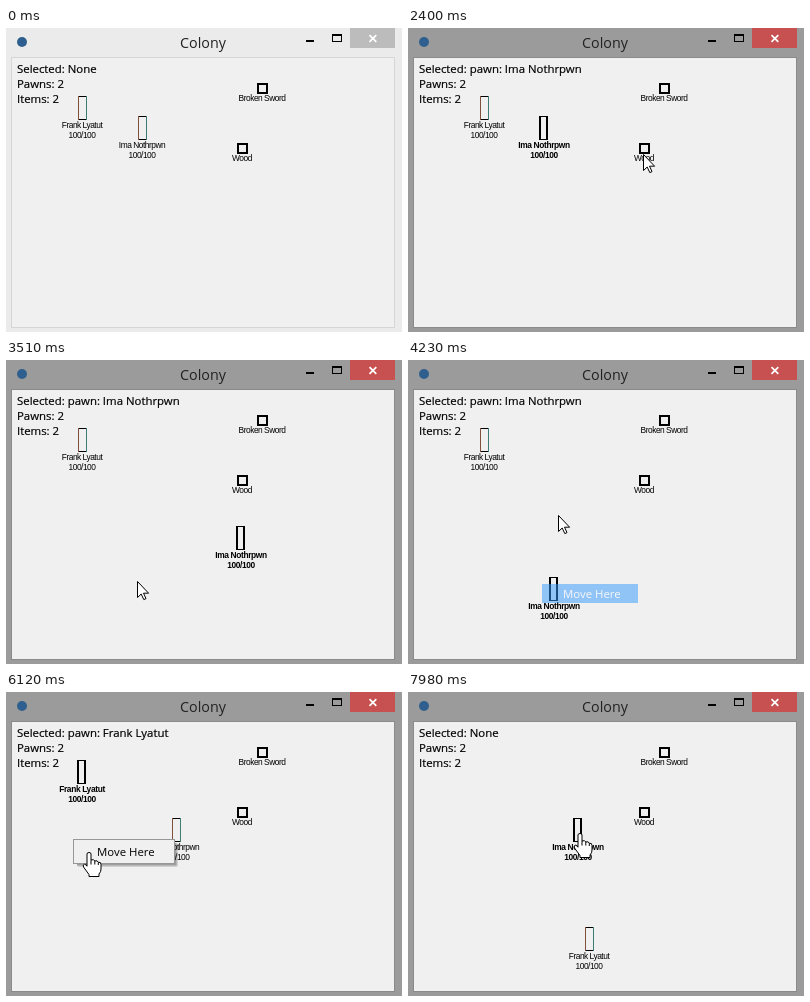
Animation, 396 px wide and 304 px high, one loop 8 s. Source, as an HTML page:

```html
<!DOCTYPE html>
<html lang="en">
<head>
<meta charset="utf-8">
<title>Colony</title>
<style>
html, body { margin: 0; width: 100%; height: 100%; overflow: hidden; background: #ebebeb; }
svg { display: block; width: 396px; height: 304px; }
.ui { font: 11.4px "Open Sans", "Noto Sans", sans-serif; }
.status { stroke: #000; stroke-width: .2px; }
.tag { font: 8.4px "Liberation Sans", sans-serif; letter-spacing: -.48px; text-anchor: middle; }
.bold .tag { font-weight: bold; letter-spacing: -.36px; }
</style>
</head>
<body>
<svg id="stage" viewBox="0 0 396 304" xmlns="http://www.w3.org/2000/svg">
  <rect id="frame" width="396" height="304"/>
  <circle cx="16" cy="14" r="5" fill="#2f5f8f"/>
  <text class="ui" x="197" y="20" text-anchor="middle" style="font-size:14.3px" fill="#222">Colony</text>
  <rect id="close" x="344" width="45" height="20"/>
  <path d="M363.5 7.2l6.8 6.6m0-6.6l-6.8 6.6" stroke="#fff" stroke-width="1.7"/>
  <path d="M300 12h8v2h-8z"/>
  <path d="M326 6h10v8h-10zM327 8v5h8V8z" fill-rule="evenodd"/>
  <rect id="canvas" x="5.5" y="29.5" width="383" height="270" fill="#f0f0f0"/>
  <g class="ui status">
    <text id="picked" x="11" y="45"></text>
    <text x="11" y="60">Pawns: 2</text>
    <text x="11" y="75">Items: 2</text>
  </g>
  <g id="items"></g>
  <g id="pawns"></g>
  <g id="menu">
    <g id="panel">
      <g fill="#000" fill-opacity=".13">
        <rect x="4" y="4" width="101" height="24" rx="2"/>
        <rect x="4" y="4" width="100" height="23" rx="1"/>
        <rect x="4" y="4" width="99" height="22"/>
      </g>
      <rect x=".5" y=".5" width="101" height="24" fill="#f0f0f0" stroke="#979797"/>
    </g>
    <rect id="glow" x="3" y="3" width="96" height="19" fill="#3399ff"/>
    <text id="option" class="ui" x="24" y="17">Move Here</text>
  </g>
  <g id="pointer" fill="#fff" stroke="#000" stroke-linejoin="round">
    <path id="arrow" d="M.5 .5V16.5L4.2 13L6.8 18.6L9 17.6L6.5 12.2H11.6Z"/>
    <path id="hand" transform="translate(0 -1)" d="M-2 2Q-2 .5 0 .5Q2 .5 2 2V8Q5 6.8 5.8 9Q8.6 8 9.3 10.3Q12 9.6 12 12.5V17Q12 20 10 22V24.5H0V22.5L-5.5 15Q-6.5 12.5 -4.5 12.2Q-3 12.5 -2 14.2ZM2 8V12.5M5.8 9V12.5M9.3 10.3V13"/>
  </g>
</svg>
<script>
const LOOP = 8000, TICK = 30;
const TRIP = 230, REST = 120, FADE_IN = 150, FADE_OUT = 240;
const $ = id => document.getElementById(id);
const clamp = v => Math.max(0, Math.min(1, v));
const easeOut = v => 1 - (1 - v) ** 2;
const show = (el, on) => el.setAttribute("display", on ? "inline" : "none");
const place = (el, x, y) => el.setAttribute("transform", `translate(${x} ${y})`);

function add(parent, tag, attrs, text) {
  const el = document.createElementNS("http://www.w3.org/2000/svg", tag);
  for (const k in attrs) el.setAttribute(k, attrs[k]);
  if (text) el.textContent = text;
  return parent.appendChild(el);
}

const frank = { name: "Frank Lyatut", home: [76, 80] };
const ima = { name: "Ima Nothrpwn", home: [136, 100] };
const pawns = [frank, ima];

const picks = [
  { pawn: ima, from: 1380, to: 5310 },
  { pawn: frank, from: 5490, to: 7590 },
  { pawn: ima, from: 7980, to: LOOP }
];

// The pointer reaches a menu corner, then clicks where the pawn should go.
const moves = [
  { pawn: ima, corner: [217, 170], drop: [235, 178], reach: 2630, click: 3050 },
  { pawn: ima, corner: [131, 221], drop: [146, 229], reach: 3510, click: 4110 },
  { pawn: ima, corner: [152, 128], drop: [170, 138], reach: 4350, click: 4820 },
  { pawn: frank, corner: [67, 147], drop: [83, 161], reach: 5700, click: 6180 },
  { pawn: frank, corner: [158, 237], drop: [181, 247], reach: 6510, click: 7110 }
];
for (const m of moves) m.open = m.reach + REST;

const trip = (from, to, spot) => ({ from, to, spot });
const trips = [
  trip(150, 900, [141, 107]),
  trip(930, 1230, [135, 95]),
  trip(1380, 2220, [235, 126]),
  trip(4840, 5190, [72, 79]),
  trip(7140, 7470, [172, 151]),
  trip(7590, 7800, [172, 142]),
  ...moves.flatMap(m => [
    trip(m.reach - TRIP, m.reach, m.corner),
    trip(m.click - 120, m.click - 60, m.drop)
  ])
].sort((a, b) => a.from - b.from);

for (const [x, y, name] of [[256, 60, "Broken Sword"], [236, 120, "Wood"]]) {
  const g = add($("items"), "g", { transform: `translate(${x} ${y})` });
  add(g, "rect", { x: -4, y: -4, width: 9, height: 9, fill: "none", stroke: "#000", "stroke-width": 2 });
  add(g, "text", { class: "tag", y: 13 }, name);
}

for (const p of pawns) {
  p.g = add($("pawns"), "g", {});
  p.caps = add(p.g, "path", {});
  p.left = add(p.g, "path", {});
  p.right = add(p.g, "path", {});
  add(p.g, "text", { class: "tag", y: 20 }, p.name);
  add(p.g, "text", { class: "tag", y: 30 }, "100/100");
}

function drawPawn(p, t, bold) {
  const last = moves.filter(m => m.pawn === p && m.click <= t).pop();
  const [x, y] = p.spot = last ? last.drop : p.home;
  const w = bold ? 2 : 1, a = bold ? -5 : -4, b = a + 9;
  place(p.g, x, y);
  p.g.setAttribute("class", bold ? "bold" : "");
  p.caps.setAttribute("d", `M${a} -12H${b}v1H${a}zM${a} 11H${b}v1H${a}z`);
  p.left.setAttribute("d", `M${a} -12h${w}v24h${-w}z`);
  p.right.setAttribute("d", `M${b} -12h${-w}v24h${w}z`);
  p.left.setAttribute("fill", bold ? "#000" : "#80503c");
  p.right.setAttribute("fill", bold ? "#000" : "#3c7c74");
}

function drawMenu(t) {
  const m = moves.find(m => t > m.open && t < m.click + FADE_OUT);
  show($("menu"), m);
  if (!m) return null;
  const gone = t >= m.click, hot = t > m.click - 60;
  place($("menu"), ...m.corner);
  $("menu").setAttribute("opacity", gone ? 1 - (t - m.click) / FADE_OUT : clamp((t - m.open) / FADE_IN));
  show($("panel"), !gone);
  show($("glow"), hot);
  $("option").setAttribute("fill", hot ? "#fff" : "#000");
  return gone ? null : m.corner;
}

function pointerAt(t) {
  let at = [396, 215];
  for (const { from, to, spot } of trips) {
    const k = easeOut(clamp((t - from) / (to - from)));
    at = at.map((v, i) => v + (spot[i] - v) * k);
  }
  return at.map(Math.round);
}

function draw(time) {
  const t = Math.floor(time / TICK) * TICK;
  const k = clamp((t - 90) / 180);
  const mix = (a, b) => `rgb(${a.map((v, i) => Math.round(v + (b[i] - v) * k))})`;
  $("frame").setAttribute("fill", mix([235, 235, 235], [155, 155, 155]));
  $("close").setAttribute("fill", mix([188, 188, 188], [199, 80, 80]));
  $("canvas").setAttribute("stroke", mix([214, 214, 214], [138, 138, 138]));

  const pick = picks.find(s => t >= s.from && t < s.to);
  const named = pick && t > pick.from;   // the status line lags one tick
  $("picked").textContent = "Selected: " + (named ? "pawn: " + pick.pawn.name : "None");
  for (const p of pawns) drawPawn(p, t, pick && pick.pawn === p);

  const corner = drawMenu(t);
  const [x, y] = pointerAt(t);
  const overPawn = pawns.some(({ spot }) => Math.abs(x - spot[0]) < 8 && Math.abs(y - spot[1]) < 14);
  const hover = overPawn || (corner && x > corner[0] + 3 && y > corner[1] + 3);
  place($("pointer"), x, y);
  show($("pointer"), t >= 150);
  show($("hand"), hover);
  show($("arrow"), !hover);
}

function run() {
  draw(performance.now() % LOOP);
  requestAnimationFrame(run);
}
run();
</script>
</body>
</html>
```
